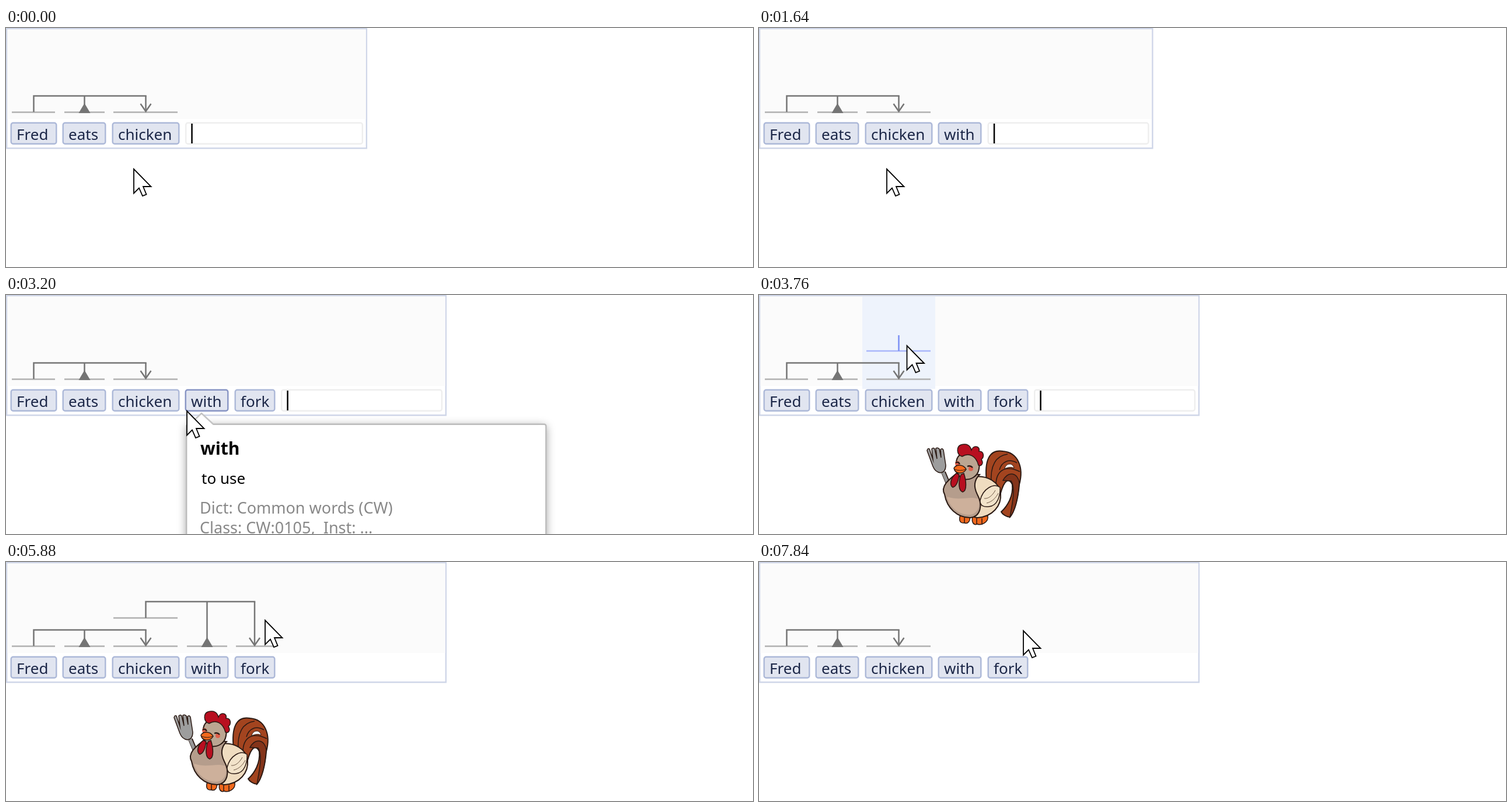
An HTML page with a canvas that plays this animation: 1280 by 410 pixels, repeating every 8000 ms.

```html
<!DOCTYPE html>
<html lang="en">
<head>
<meta charset="utf-8">
<title>Sentence editor</title>
<style>
html, body { margin: 0; width: 100%; height: 100%; overflow: hidden; background: #fff }
canvas { display: block }
</style>
</head>
<body>
<canvas id="stage" width="1280" height="410"></canvas>
<script>
const ctx = document.getElementById('stage').getContext('2d');
const LOOP = 8000, GREY = '#757575', BLUE = '#7b8ff5', FONT = '"Noto Sans", sans-serif';

// word, left edge, right edge, text start, underline start and end, axis of its column
const [SUBJ, VERB, OBJ, WITH, FORK] = [
  ['Fred', 8, 87, 18, 10, 84, 47.5],
  ['eats', 97, 171, 107, 100, 169, 134.5],
  ['chicken', 182, 297, 192, 184, 294, 239.5],
  ['with', 307, 381, 317, 310, 379, 344.5],
  ['fork', 392, 461, 402, 394, 464, 426]
].map(([word, x0, x1, textX, u0, u1, mid]) => ({ word, x0, x1, textX, u0, u1, mid }));
const TAGS = [SUBJ, VERB, OBJ, WITH, FORK];

const USE = ['with', '(to use)'], ACCOMPANY = ['with', '(to be accompanied by)'];
const SUGGESTIONS = {
  w: [['water'], ['who'], USE, ACCOMPANY],
  wi: [USE, ACCOMPANY], wit: [USE, ACCOMPANY], with: [USE, ACCOMPANY],
  f: [['food'], ['fork'], ['from'], ['friend']],
  fo: [['food'], ['fork']], for: [['fork']], fork: [['fork']]
};

// time, x, y of the pointer tip
const POINTER = [
  [0, 219, 242], [2040, 219, 242], [2400, 316, 194], [3160, 316, 194], [3200, 310, 199],
  [3760, 253.5, 87], [4400, 253.5, 87], [4640, 364, 99], [5280, 364, 99], [5440, 444, 100],
  [6640, 444, 100], [6760, 453, 118], [LOOP, 453, 118]
];
const CLICKS = [[4080, 4240], [5000, 5120], [5760, 5880], [7160, 7300]];

const within = (t, a, b) => t >= a && t < b;

function pointerAt(t) {
  const i = POINTER.findIndex(k => k[0] > t);
  const [t0, x0, y0] = POINTER[i - 1], [t1, x1, y1] = POINTER[i];
  const p = (t - t0) / (t1 - t0), e = p * p * (3 - 2 * p);
  return [x0 + (x1 - x0) * e, y0 + (y1 - y0) * e];
}

function rect(x, y, w, h, color) {
  ctx.fillStyle = color;
  ctx.fillRect(x, y, w, h);
}

function box(x0, y0, x1, y1, fill, border, radius = 0) {
  ctx.beginPath();
  ctx.roundRect(x0 + 1.2, y0 + 1.2, x1 - x0 - 2.4, y1 - y0 - 2.4, radius);
  ctx.fillStyle = fill;
  ctx.fill();
  ctx.shadowColor = 'transparent';
  ctx.strokeStyle = border;
  ctx.lineWidth = 2.4;
  ctx.stroke();
}

function shadow(blur, y, alpha) {
  ctx.shadowColor = `rgba(0,0,0,${alpha})`;
  ctx.shadowBlur = blur;
  ctx.shadowOffsetY = y;
}

function text(str, x, y, color, size = 26, weight = 400) {
  ctx.font = `${weight} ${size}px ${FONT}`;
  ctx.fillStyle = color;
  ctx.fillText(str, x, y);
  return x + ctx.measureText(str).width;
}

function lines(color, ...points) {
  ctx.beginPath();
  points.forEach(([x, y], i) => i ? ctx.lineTo(x, y) : ctx.moveTo(x, y));
  ctx.strokeStyle = color;
  ctx.lineWidth = 2.5;
  ctx.stroke();
}

function shape(d, fill, stroke, width = 1.5) {
  const path = new Path2D(d);
  if (fill) { ctx.fillStyle = fill; ctx.fill(path); }
  if (stroke) { ctx.strokeStyle = stroke; ctx.lineWidth = width; ctx.stroke(path); }
}

const underline = (tag, y = 144.5, color = '#b0b0b0') => lines(color, [tag.u0, y], [tag.u1, y]);

function arrow(x, from, tip, color = GREY) {
  lines(color, [x, from], [x, tip]);
  lines(color, [x - 9, tip - 13], [x, tip], [x + 9, tip - 13]);
}

function verbMark(x, top) {
  lines(GREY, [x, top], [x, 135]);
  shape(`M${x - 10} 146L${x} 129L${x + 10} 146Z`, GREY);
}

function relation(a, verb, b, top, startY, tip, color) {
  lines(GREY, [a.mid, startY], [a.mid, top], [b.mid + 1.2, top]);
  verbMark(verb.mid, top);
  arrow(b.mid, top, tip, color);
}

function drawDiagram(t, x) {
  if (within(t, 3640, 5880)) {
    const [l, r] = x < 302 ? [177, 302] : x < 387 ? [302, 387] : [387, 467];
    rect(l, 3, r - l, 158, '#eef3fc');
  }
  const marked = within(t, 6720, 7240);
  if (marked) {
    shape('M180 160V104Q180 100 184 100H463Q467 100 467 104V160H390V125H384V160H305V125H300V160Z', '#e5e8fb');
  }

  underline(SUBJ);
  underline(VERB);
  const raised = within(t, 6400, 7840);
  const joined = t < 7240;
  if (joined || !raised) underline(OBJ);
  relation(SUBJ, VERB, OBJ, raised ? 68 : 116.5, 144, raised ? 95 : 143);

  const top = raised ? 116.5 : 68;
  if (within(t, 3640, 7840)) underline(OBJ, 96, t < 4080 ? '#a9b6fa' : undefined);
  if (within(t, 5000, 7240)) underline(WITH);
  if (within(t, 5760, 7240)) underline(FORK);

  if (within(t, 3640, 7240)) {
    if (x < 302) {
      lines(t < 4080 ? BLUE : GREY, [OBJ.mid, 96], [OBJ.mid, 69]);
    } else if (x < 387) {
      lines(GREY, [OBJ.mid, 96], [OBJ.mid, 68], [WITH.mid + 1.2, 68]);
      arrow(WITH.mid, 68, 134, BLUE);
      if (t >= 5000) verbMark(WITH.mid, 68);
    } else {
      relation(OBJ, WITH, FORK, top, raised ? 144 : 96, 143, t < 5760 ? BLUE : GREY);
    }
  }

  if (marked) {
    ctx.beginPath();
    ctx.roundRect(435, 100, 28, 28, 5);
    ctx.fillStyle = '#999';
    ctx.fill();
    ctx.strokeStyle = '#fff';
    ctx.lineWidth = 4.5;
    ctx.stroke(new Path2D('M442 107L456 121M456 107L442 121'));
  }
}

function drawSuggestions(typed, x0) {
  const rows = SUGGESTIONS[typed];
  const x1 = x0 + (typed === 'f' ? 900 : 824);
  const divider = 222 + 54 * rows.length;
  shadow(12, 4, .35);
  box(x0, 208.5, x1, divider + 55, '#fff', '#969696');
  rect(x0 + 2.4, 216, x1 - x0 - 4.8, 54, '#c9d1e9');
  rect(x0 + 2.4, 218.4, x1 - x0 - 4.8, 49.2, '#e6eaf4');
  rect(x0 + 2.4, divider - 1.2, x1 - x0 - 4.8, 54, '#fbfbfb');
  rect(x0 + 2.4, divider - 1.2, x1 - x0 - 4.8, 2.4, '#dcdcdc');
  rows.forEach(([word, sense], i) => {
    const y = 253 + 54 * i;
    let x = text(word, x0 + 12, y, '#38569b', 28, 700) + 18;
    if (sense) x = text(sense, x, y, '#1a1a1a', 27) + 22;
    text('(CW)', x + (sense ? 0 : 2), y, '#a9a9a9', 27);
  });
  const end = text(`Create '${typed}'`, x0 + 12, divider + 36, '#8f8f8f', 28, 700) + 18;
  shape(`M${end} ${divider + 20}l11 5.5l-11 5.5Z`, '#8f8f8f');
}

function drawTooltip() {
  shadow(16, 3, .4);
  box(308, 220.5, 926.5, 440, '#fff', '#bcbcbc', 3);
  shape('M315 223L335 203L355 223Z', '#fff');
  shape('M315 221.5L335 203L355 221.5', null, '#c4c4c4', 2.4);
  text('with', 333, 274, '#000', 30, 700);
  text('to use', 335, 324, '#000');
  text('Dict: Common words (CW)', 332, 375, '#888', 27);
  text('Class: CW:0105,\u00a0 Inst: ...', 332, 409, '#888', 27);
}

function drawHen() {
  const ink = '#2b1a14';
  shape('M390 320C386 285 394 264 418 268C444 270 454 296 446 325C444 350 438 372 430 381C424 381 417 376 415 372C426 362 436 345 434 325C428 312 420 318 414 340C408 352 400 340 398 325Z', '#a3441f', ink, 2);
  shape('M418 318C428 300 444 306 446 322C444 350 438 372 430 381C434 358 440 330 432 319Z', '#84341a', ink);
  shape('M398 324C396 295 404 276 426 273M406 326C406 303 420 290 447 303M412 300C416 286 428 280 442 288', null, ink);
  shape('M421 298C423 288 435 287 437 297C431 294 426 296 421 298Z', '#fff', ink, 1);
  shape('M316 304L326 328', null, ink, 8);
  shape('M312 296L326 329', null, '#979797', 5.5);
  shape('M288 267Q289 262 292 264L298 282L296 264Q299 261 301 264L305 281L303 263Q306 261 309 264L312 279L311 265Q314 262 316 266L320 292Q320 304 311 305Q302 304 298 294Z', '#9d9d9d', ink);
  shape('M345 377C342 386 344 392 352 391C358 393 363 388 361 378ZM367 378C363 388 367 396 374 393C382 396 394 389 392 379Z', '#f2691d', ink);
  shape('M352 382V391M373 383V393M382 383V392', null, ink);
  shape('M366 312C392 308 412 322 414 340C416 362 400 380 375 382C360 382 350 360 366 312Z', '#efdcc0', ink, 2);
  shape('M340 305C326 316 310 328 318 342C322 366 340 382 362 382C380 380 384 360 374 342C368 330 368 318 378 308Z', '#b59d8c', ink, 2);
  shape('M322 346C345 354 360 344 376 350C380 366 372 378 358 377C340 376 326 362 322 346Z', '#cdb09b');
  shape('M379 352C384 332 402 322 413 330C414 345 408 362 394 363C386 364 378 362 379 352Z', '#f2e3ca', ink);
  shape('M386 349C393 350 400 344 405 335M390 357C399 355 406 348 410 340', null, '#6b5543', 1);
  shape('M338 290C337 275 350 268 360 270C374 271 380 282 377 298C375 312 362 318 350 316C340 312 338 300 338 290Z', '#bba692', ink, 2);
  shape('M348 277C338 274 338 260 346 257C356 254 362 258 364 266C368 256 380 260 377 268C386 268 386 278 381 282C386 290 380 294 376 292C372 276 360 270 348 277Z', '#b80f20', ink);
  shape('M338 306C328 314 326 326 332 330C340 328 342 316 343 308ZM346 308C341 322 342 336 349 338C357 336 355 318 351 306Z', '#b80f20', ink);
  shape('M336 289a4 4 0 1 0 8 0a4 4 0 1 0 -8 0M359 298a4 4 0 1 0 8 0a4 4 0 1 0 -8 0', '#e0604c');
  shape('M337 288Q341 285 344 290M357 294Q362 292 366 296', null, ink, 2.4);
  shape('M334 297C338 290 350 290 355 299C350 308 336 308 334 297Z', '#f2691d', ink);
  shape('M335 299Q345 303 354 299', null, ink, 1);
}

function drawPointer(x, y, pressed) {
  ctx.save();
  ctx.translate(x, y);
  shape('M0 0V41.5L9 32.5L15 46L21.5 43.5L16 30H29.5Z', '#fff', '#000', 1.8);
  if (pressed) {
    ctx.globalCompositeOperation = 'multiply';
    shape('M-31 -.5a31 31 0 1 0 62 0a31 31 0 1 0 -62 0', '#fafb80');
  }
  ctx.restore();
}

function draw(t) {
  const [x, y] = pointerAt(t);
  const count = t < 1640 ? 3 : t < 2000 ? 4 : 5;
  const right = [619, 675.5, 755][count - 3];
  const inputX = [307, 391.5, 471][count - 3];
  const typed = count === 3 ? 'with'.slice(0, Math.max(0, Math.floor((t - 400) / 80)))
    : count === 4 ? 'fork'.slice(0, Math.max(0, Math.floor((t - 1760) / 40))) : '';

  rect(0, 0, 1280, 410, '#fff');
  box(0, 0, right, 207.5, '#fff', '#cfd6e8');
  rect(2.4, 2.4, right - 4.8, 153.6, '#fbfbfb');
  drawDiagram(t, x);

  TAGS.slice(0, count).forEach(tag => {
    const hovered = tag === WITH && within(t, 2360, 3280);
    box(tag.x0 - .5, 161.5, tag.x1 + .5, 200, '#e1e5f0', hovered ? '#8794c4' : '#acb8d8', 3.5);
    text(tag.word, tag.textX, 192, '#1c2748');
  });

  if (t < 4080) {
    box(inputX, 161.5, right - 7, 200, '#fff', '#eee', 3.5);
    const end = text(typed, inputX + 10, 192, '#111');
    rect(end + (typed ? -.5 : .3), 164, 2.5, 34, '#000');
  }
  if (typed) drawSuggestions(typed, inputX);
  if (within(t, 2640, 3400)) drawTooltip();
  if (within(t, 3400, 7360)) {
    ctx.globalAlpha = Math.min(1, (7360 - t) / 120);
    drawHen();
    ctx.globalAlpha = 1;
  }
  drawPointer(x, y, CLICKS.some(([a, b]) => within(t, a, b)));
}

const start = performance.now();
function tick() {
  draw((performance.now() - start) % LOOP);
  requestAnimationFrame(tick);
}
tick();
</script>
</body>
</html>
```
